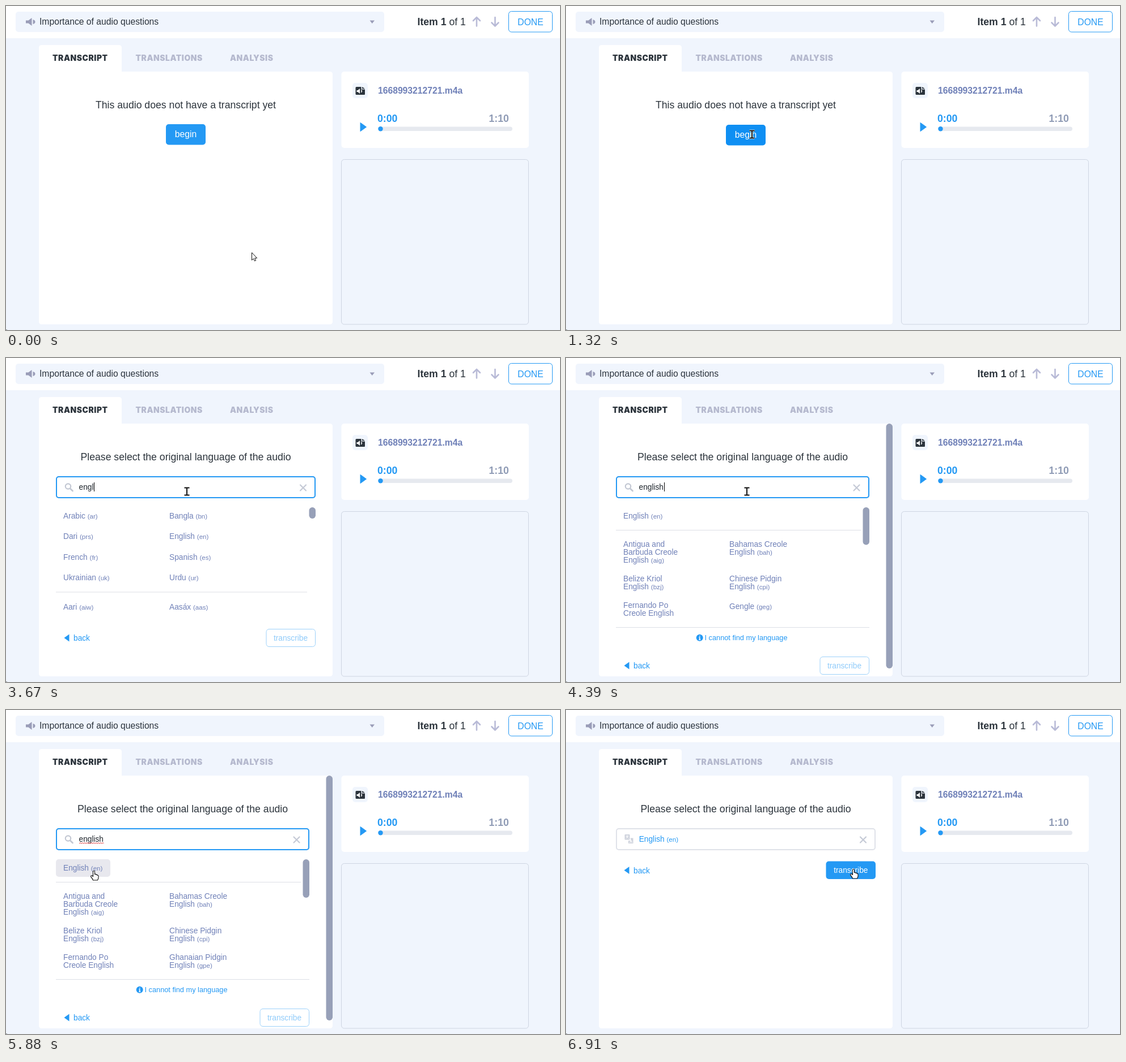
Animation of 977x573 px, one loop 8000 ms. Source, as an HTML page:

```html
<!DOCTYPE html>
<html lang="en">
<head>
<meta charset="utf-8">
<title>Transcript language picker</title>
<style>
  html, body { margin: 0; width: 100%; height: 100%; overflow: hidden; background: #f0f5fd; }
  svg { display: block; width: 977px; height: 573px; font: 13.73px "Liberation Sans", Arial, sans-serif; }

  .dark { fill: #2c343c; }
  .blue { fill: #2499f4; }
  .slate { fill: #7081b8; }
  .white { fill: #fff; }
  .bar { fill: #97a0b8; }
  .code { font-size: 11.6px; }
  .mid { text-anchor: middle; }
  .s16 { font-size: 15.7px; }
  .s18 { font-size: 17.66px; }
  .bold { font-weight: 700; }
  .tab { font: 900 13.9px Inter, "Open Sans", sans-serif; letter-spacing: .55px; fill: #b5b9ce; }
  .tab.dark { fill: #2c343c; }
  .rule { stroke: #dcdfe6; }
  .field { fill: #fff; stroke: #dfe2e9; stroke-width: 2; }
  .focus { fill: none; stroke: #2499f4; stroke-width: 2; }
  .line { fill: none; stroke-linecap: round; stroke-linejoin: round; }

  /* One loop is 8 s, so 1% is 80 ms. */
  .a { animation: 8s step-end infinite; }
  .intro { animation-name: intro; }
  .button { animation-name: press; }
  .button rect { animation: hover 8s linear infinite; }
  .wide { animation-name: wide; }
  .searching { animation-name: searching; }
  .list { animation-name: list; }
  .hint { animation-name: hint; }
  .clear { animation-name: clear; }
  .narrow { animation-name: narrow; }
  .narrow .focus { animation-name: blur; }
  .early { animation-name: early; }
  .late { animation-name: late; }
  .pill { animation: pill 8s linear infinite; }
  .typed { animation-name: typed; }
  .cover { animation-name: type; }
  .caret { animation-name: caret; }
  .spell { animation-name: spell; }
  .chosen { animation-name: chosen; }
  .cursor { animation: move 8s ease-in-out infinite; }
  .arrow { animation-name: arrow; }
  .beam { animation-name: beam; }
  .hand { animation-name: hand; }

  @keyframes intro { 0% { opacity: 1 } 18.5%, to { opacity: 0 } }
  @keyframes hover { 0%, 6.4% { fill: #2499f4 } 7.8%, to { fill: #0f8ff3 } }
  @keyframes press { 0% { transform: none } 14%, to { transform: translateY(1px) } }
  @keyframes wide {
    0% { opacity: 0 }
    18.5% { opacity: 0; animation-timing-function: linear }
    23.5% { opacity: 1 } 54.875% { opacity: 0 }
    57.75% { opacity: 1 } 62.5% { opacity: 0 }
    77.125%, to { opacity: 1 }
  }
  @keyframes searching { 0% { opacity: 1 } 77.125%, to { opacity: 0 } }
  @keyframes list { 0% { opacity: 1 } 49.75%, to { opacity: 0 } }
  @keyframes hint { 0% { opacity: 1 } 37%, to { opacity: 0 } }
  @keyframes clear { 0% { opacity: 0 } 37%, to { opacity: 1 } }
  @keyframes narrow {
    0% { opacity: 0 } 54.875% { opacity: 1 } 57.75% { opacity: 0 }
    62.5% { opacity: 1 } 77.125%, to { opacity: 0 }
  }
  @keyframes blur { 0% { opacity: 1 } 76.75%, to { opacity: 0 } }
  @keyframes early { 0% { opacity: 1 } 57.75%, to { opacity: 0 } }
  @keyframes late { 0% { opacity: 0 } 57.75%, to { opacity: 1 } }
  @keyframes pill { 0%, 71.5% { opacity: 0 } 72.6%, to { opacity: 1 } }
  @keyframes typed { 0% { opacity: 0 } 23.5% { opacity: 1 } 77.125%, to { opacity: 0 } }
  @keyframes type {
    0% { transform: none }
    37% { transform: translateX(7.6px) }
    40.5% { transform: translateX(15.3px) }
    43% { transform: translateX(22.9px) }
    45.875% { transform: translateX(26px) }
    49.75% { transform: translateX(29px) }
    52.25% { transform: translateX(35.9px) }
    54.875%, to { transform: translateX(43.5px) }
  }
  @keyframes caret {
    0% { opacity: 0 } 23.5% { opacity: 1 } 30.125% { opacity: 0 }
    37% { opacity: 1 } 61.5%, to { opacity: 0 }
  }
  @keyframes spell { 0% { opacity: 0 } 67%, to { opacity: 1 } }
  @keyframes chosen { 0% { opacity: 0 } 77.125%, to { opacity: 1 } }
  @keyframes move {
    0%, 1.1% { transform: translate(433px, 436px) }
    7.875%, 27.25% { transform: translate(328px, 227px) }
    28.125%, 67.1% { transform: translate(319px, 236px) }
    73.5%, 83.8% { transform: translate(155px, 284px) }
    86.375%, to { transform: translate(507px, 281px) }
  }
  @keyframes arrow {
    0% { opacity: 1 } 6.4% { opacity: 0 } 69.4% { opacity: 1 } 71.5% { opacity: 0 }
    80% { opacity: 1 } 85.6%, to { opacity: 0 }
  }
  @keyframes beam { 0% { opacity: 0 } 6.9% { opacity: 1 } 69.4%, to { opacity: 0 } }
  @keyframes hand {
    0% { opacity: 0 } 6.4% { opacity: 1 } 6.9% { opacity: 0 }
    71.5% { opacity: 1 } 80% { opacity: 0 } 85.6%, to { opacity: 1 }
  }
</style>
</head>
<body>
<svg viewBox="0 0 977 573">
  <defs>
    <text id="heading" class="dark s18 mid" y="181">Please select the original language of the audio</text>
    <path id="cross" class="line" d="M-5 -5L5 5M5 -5L-5 5" stroke="#c5cad6" stroke-width="2.2"/>
    <g id="lens" class="line" stroke="#c3c8d3">
      <circle cx="109.5" cy="227" r="4.7" stroke-width="2.2"/>
      <path d="M113.3 231L117.5 235" stroke-width="2.8"/>
    </g>
    <g id="back" class="blue">
      <path d="M102.5 0L111.5 -6.5V6.5Z"/>
      <text x="119" y="5">back</text>
    </g>
    <g id="disabled">
      <rect x=".5" y="-15.5" width="86.5" height="31" rx="5" fill="#fff" stroke="#9dd1fa"/>
      <text class="mid" x="43.5" y="5" fill="#8fcbfa">transcribe</text>
    </g>
    <pattern id="wave" width="4" height="3" x="129" y="234" patternUnits="userSpaceOnUse">
      <path d="M0 2.2L2 .7L4 2.2" fill="none" stroke="#e03a3a"/>
    </pattern>
  </defs>

  <!-- Header -->
  <rect class="white" width="977" height="57"/>
  <rect x="17" y="10" width="650" height="36" rx="5" fill="#f0f5fd"/>
  <g fill="#9a9db8">
    <path d="M35 25.5H39.5L45.5 21V35L39.5 30.5H35Z"/>
    <path d="M47.5 24Q51.5 25 51.5 28T47.5 32Z"/>
    <path d="M641.5 25.5H650L645.7 31Z"/>
  </g>
  <text class="dark s16" x="59" y="33">Importance of audio questions</text>
  <text class="dark s18" x="725.5" y="34"><tspan class="bold">Item 1</tspan> of 1</text>
  <g class="line" stroke="#b9bbd7" stroke-width="2.6">
    <path d="M830 35.5V20.5M824 26L830 20L836 26"/>
    <path d="M862.5 20V35M856.5 29.5L862.5 35.5L868.5 29.5"/>
  </g>
  <rect x="886.5" y="9.5" width="77" height="36.5" rx="5" fill="#fff" stroke="#2499f4"/>
  <text class="blue s16 mid" x="925" y="33.7">DONE</text>

  <!-- Tabs and main panel -->
  <path class="white" d="M58 116V74Q58 69 63 69H199Q204 69 204 74V116H571Q576 116 576 121V558Q576 563 571 563H63Q58 563 58 558Z"/>
  <text class="tab dark" x="82" y="97.3">TRANSCRIPT</text>
  <text class="tab" x="228.5" y="97.3">TRANSLATIONS</text>
  <text class="tab" x="395" y="97.3">ANALYSIS</text>

  <!-- Audio card -->
  <rect class="white" x="591.5" y="116" width="330.5" height="135" rx="5"/>
  <rect x="611" y="136" width="27" height="27" rx="5" fill="#f0f5fd"/>
  <path class="dark" d="M618 143H626.5V147.5H633V156Q633 157 632 157H618Q616.500 157 616.500 155.500V144.500Q616.500 143 618 143ZM628 143L633 146.300H628Z"/>
  <path class="white" d="M618.500 149H620.500L624 146V155L620.500 152H618.500Z"/>
  <path class="line" d="M626.500 148.800Q628.300 150.500 626.500 152.300" stroke="#fff" stroke-width="1.4"/>
  <text class="slate s16 bold" x="656" y="155">1668993212721.m4a</text>
  <path class="blue" d="M624.500 206.500Q624.500 205.500 625.500 206.200L635.500 213.500Q636 214 635.500 214.500L625.500 221.800Q624.500 222.500 624.500 221.500Z"/>
  <text class="blue s18 bold" x="655" y="204.700">0:00</text>
  <text class="s18 bold" x="851.500" y="204.700" fill="#8f9bb5">1:10</text>
  <rect x="656.500" y="213.500" width="236.500" height="7.500" rx="3.700" fill="#e6e9ef"/>
  <circle class="blue" cx="660.500" cy="217.300" r="4.200"/>
  <rect x="591.500" y="271.500" width="330" height="291.500" rx="5" fill="none" stroke="#ced5e2"/>
  <rect y="572" width="2" height="1" fill="#8b9097"/>

  <!-- No transcript yet -->
  <g class="a intro">
    <text class="dark s18 mid" x="317" y="181">This audio does not have a transcript yet</text>
    <g class="a button">
      <rect x="282" y="209" width="70" height="36.500" rx="5"/>
      <text class="white s16 mid" x="317" y="232.300">begin</text>
    </g>
  </g>

  <!-- Picker without page scrollbar -->
  <g class="a wide">
    <use href="#heading" x="317"/>
    <rect class="field" x="89" y="210" width="456" height="37" rx="4"/>
    <g class="a clear"><use href="#cross" x="524" y="229.500"/></g>
    <g class="a searching">
      <rect class="focus" x="89" y="210" width="456" height="37" rx="4"/>
      <use href="#lens"/>
      <text class="a hint" x="128.500" y="233" fill="#8b93a8">Search for a language</text>
      <use href="#back" y="495"/>
      <use href="#disabled" x="458.500" y="495"/>
      <g class="a list slate">
        <text x="101" y="284">Arabic <tspan class="code">(ar)</tspan></text>
        <text x="288" y="284">Bangla <tspan class="code">(bn)</tspan></text>
        <text x="101" y="320">Dari <tspan class="code">(prs)</tspan></text>
        <text x="288" y="320">English <tspan class="code">(en)</tspan></text>
        <text x="101" y="356.500">French <tspan class="code">(fr)</tspan></text>
        <text x="288" y="356.500">Spanish <tspan class="code">(es)</tspan></text>
        <text x="101" y="393">Ukrainian <tspan class="code">(uk)</tspan></text>
        <text x="288" y="393">Urdu <tspan class="code">(ur)</tspan></text>
        <path class="rule" d="M88 414H531"/>
        <text x="101" y="445">Aari <tspan class="code">(aiw)</tspan></text>
        <text x="288" y="445">Aasáx <tspan class="code">(aas)</tspan></text>
        <rect class="bar" x="534.500" y="264" width="11.500" height="20" rx="5.700"/>
      </g>
    </g>
    <g class="a chosen">
      <g fill="#cfd3dd">
        <rect x="103.500" y="220" width="9" height="9.500" rx="1"/>
        <path d="M114 226.500H118.500V236H110V231H114Z"/>
      </g>
      <path class="line" d="M106 223H110M108 222V223M109.500 223L106 227M106.500 223.500L110 227M112.500 234.500L114.500 229.500L116.500 234.500M113.300 233H115.700" stroke="#fff" stroke-width=".9"/>
      <text class="blue" x="128.700" y="233">English <tspan class="code">(en)</tspan></text>
      <use href="#back" y="283.500"/>
      <rect class="blue" x="458.500" y="267.500" width="87.500" height="31.500" rx="5"/>
      <text class="white mid" x="502.300" y="288">transcribe</text>
    </g>
  </g>

  <!-- Search results with page scrollbar -->
  <g class="a narrow">
    <use href="#heading" x="311.500"/>
    <rect class="bar" x="564.500" y="116" width="11.500" height="433" rx="5.700"/>
    <rect class="field" x="89" y="210" width="445" height="37" rx="4"/>
    <rect class="a focus" x="89" y="210" width="445" height="37" rx="4"/>
    <use href="#lens"/>
    <use href="#cross" x="512.500" y="229.500"/>
    <rect class="pill" x="88" y="264" width="96" height="31" rx="5" fill="#e8e8ee"/>
    <g class="slate">
      <text x="101" y="284">English <tspan class="code">(en)</tspan></text>
      <text y="334"><tspan x="101">Antigua and</tspan><tspan x="101" dy="14">Barbuda Creole</tspan><tspan x="101" dy="14">English <tspan class="code">(aig)</tspan></tspan></text>
      <text y="334"><tspan x="288">Bahamas Creole</tspan><tspan x="288" dy="14">English <tspan class="code">(bah)</tspan></tspan></text>
      <text y="395"><tspan x="101">Belize Kriol</tspan><tspan x="101" dy="14">English <tspan class="code">(bzj)</tspan></tspan></text>
      <text y="395"><tspan x="288">Chinese Pidgin</tspan><tspan x="288" dy="14">English <tspan class="code">(cpi)</tspan></tspan></text>
      <text y="442"><tspan x="101">Fernando Po</tspan><tspan x="101" dy="14">Creole English</tspan></text>
    </g>
    <g class="a early">
      <text class="slate" x="288" y="444">Gengle <tspan class="code">(geg)</tspan></text>
      <rect class="bar" x="523.500" y="264" width="11.500" height="66.500" rx="5.700"/>
    </g>
    <g class="a late">
      <text class="slate" y="442"><tspan x="288">Ghanaian Pidgin</tspan><tspan x="288" dy="14">English <tspan class="code">(gpe)</tspan></tspan></text>
      <rect class="bar" x="523.500" y="264" width="11.500" height="68" rx="5.700"/>
    </g>
    <path class="rule" d="M88 304.500H520M88 476.500H535"/>
    <circle class="blue" cx="235.700" cy="494.700" r="6"/>
    <path d="M235.800 491V492.500M234.500 494.200H235.800V498M234.300 498H237.300" fill="none" stroke="#fff" stroke-width="1.5"/>
    <text class="blue" x="244.500" y="498.500" font-size="12.75">I cannot find my language</text>
    <use href="#back" y="544"/>
    <use href="#disabled" x="447.500" y="544"/>
  </g>

  <!-- Query: the cover slides right one letter at a time -->
  <g class="a typed">
    <g class="a clear">
      <text x="128.500" y="233" fill="#1f262d">english</text>
      <g class="a cover"><rect class="white" x="128.800" y="219" width="48" height="20"/></g>
    </g>
    <rect class="a spell" x="129" y="234" width="43.500" height="3" fill="url(#wave)"/>
    <g class="a cover"><rect class="a caret" x="129" y="220" width="1" height="16"/></g>
  </g>

  <g class="cursor">
    <path class="a arrow" d="M.5 0V13.500L3.500 10.800L5.400 15L7.600 14L5.700 9.900H9.700Z" fill="#fff" stroke="#111" stroke-linejoin="round"/>
    <g class="a beam" fill="none">
      <path d="M-4.500 -6.500H4.500M-4.500 6.500H4.500M0 -6.500V6.500" stroke="#fff" stroke-width="3.600"/>
      <path d="M-4.500 -6.500H4.500M-4.500 6.500H4.500M0 -6.500V6.500" stroke="#111" stroke-width="2"/>
    </g>
    <path class="a hand" d="M-1.500 1.500Q0 -1 1.500 1.500V6.500Q3.500 5.500 4 7.500Q6 6.500 6.300 8.500Q8 8 8 10V13Q7.500 15 6.500 17H-1.500Q-2.500 14 -5.300 11Q-5.500 8 -3 9L-1.500 10.500Z" fill="#fff" stroke="#111" stroke-width="1.100" stroke-linejoin="round"/>
  </g>
</svg>
</body>
</html>
```
